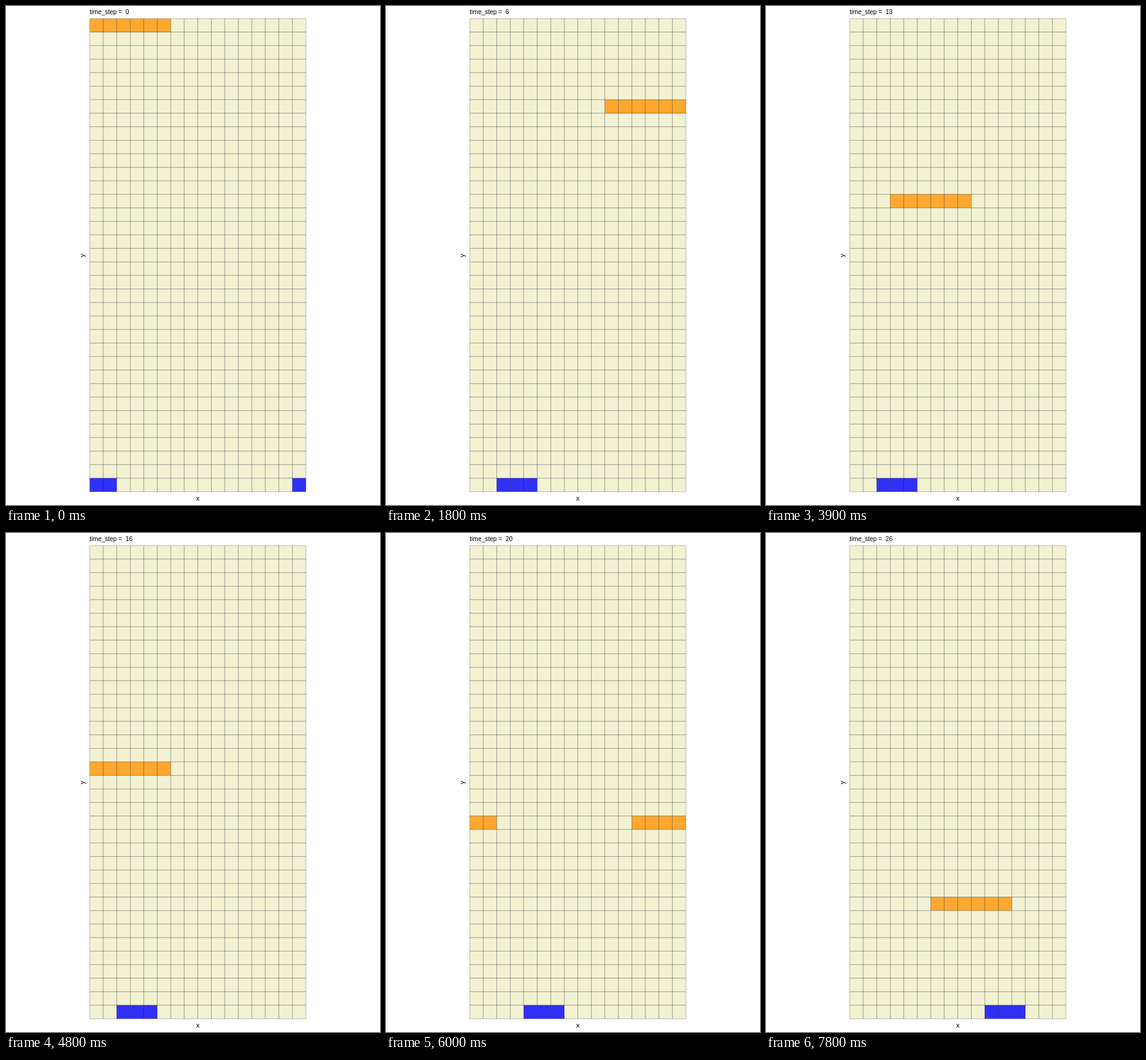
An HTML page for the animation above (8 s loop, 600 by 800 pixels).

```html
<!DOCTYPE html>
<html lang="en">
<head>
<meta charset="utf-8">
<title>Falling block</title>
<style>
html, body { margin: 0; width: 100%; height: 100%; overflow: hidden; background: #fff; }
svg { display: block; font: 11px "Liberation Sans", Arial, sans-serif; }
#time { font-size: 10px; white-space: pre; }
#grid rect { stroke: #000; stroke-opacity: .26; stroke-width: 1; }
</style>
</head>
<body>
<svg width="600" height="800" viewBox="0 0 600 800">
  <text id="time" x="134.3" y="13"></text>
  <g id="grid"></g>
  <text x="307.8" y="793" text-anchor="middle">x</text>
  <text transform="translate(126.4 400) rotate(-90)" text-anchor="middle">y</text>
</svg>
<script>
const COLS = 16, ROWS = 35, CELL = 21.67, LEFT = 134.4, TOP = 20.3;
const STEP = 300, LOOP = 8000;
const BEIGE = '#f2f2d3', ORANGE = '#fea830', BLUE = '#3030f7';
const grid = document.getElementById('grid');
const label = document.getElementById('time');
const cells = [];

for (let i = 0; i < COLS * ROWS; i++) {
  const r = document.createElementNS('http://www.w3.org/2000/svg', 'rect');
  r.setAttribute('x', LEFT + (i % COLS) * CELL);
  r.setAttribute('y', TOP + Math.floor(i / COLS) * CELL);
  r.setAttribute('width', CELL);
  r.setAttribute('height', CELL);
  r.setAttribute('fill', BEIGE);
  cells.push(grid.appendChild(r));
}

// Fills a run of cells that wraps around the row.
function paint(row, start, length, color) {
  for (let i = 0; i < length; i++) {
    const col = (start + i + 2 * COLS) % COLS;
    cells[row * COLS + col].setAttribute('fill', color);
  }
}

function draw(step) {
  label.textContent = 'time_step =  ' + step;
  cells.forEach(c => c.setAttribute('fill', BEIGE));
  paint(step, -step, 6, ORANGE);
  // The paddle moves right, waits, then moves right again.
  paint(ROWS - 1, -1 + Math.min(step, 3) + Math.max(0, step - 18), 3, BLUE);
}

let shown = -1;
const begin = performance.now();
function tick(now) {
  const step = Math.floor(Math.max(0, now - begin) % LOOP / STEP);
  if (step !== shown) draw(shown = step);
  requestAnimationFrame(tick);
}
tick(begin);
</script>
</body>
</html>
```
